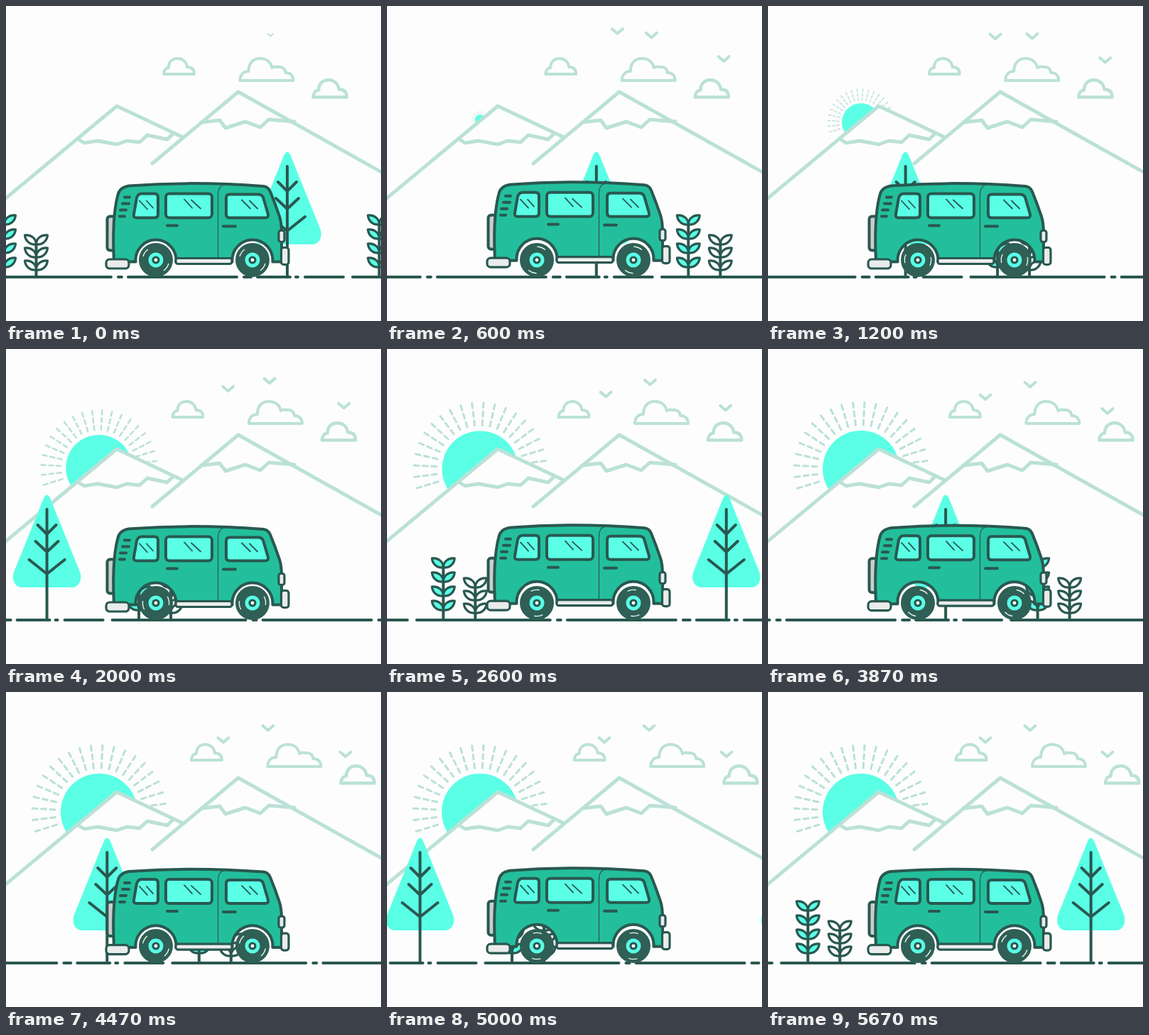
These frames come from a looping animation (528 by 444 pixels, 5740 ms). An HTML page:

```html
<!DOCTYPE html>
<html lang="en">
<head>
<meta charset="utf-8">
<title>Van trip</title>
<style>
  html, body { margin: 0; width: 100%; height: 100%; overflow: hidden; background: #fdfdfd; }
  svg { display: block; width: 528px; height: 444px; }
  .pale, .dark { fill: none; stroke-width: 4; stroke-linecap: round; stroke-linejoin: round; }
  .pale { stroke: #bbe1d7; }
  .dark { stroke: #295850; }
  .ridge { stroke-width: 5; }
  .medium { stroke-width: 3.2; }
  .thin { stroke-width: 1.8; }
  .paper { fill: #fdfdfd; }
  .cyan { fill: #5affe6; }
  .body { fill: #23bf9c; }
  .chrome { fill: #e9eceb; }
  .grey { fill: #c9cecd; }
  .tire { fill: #2f5f55; }
  .shine { fill: none; stroke: #e4f3ee; stroke-width: 1.4; }
  #road { stroke-dasharray: 148 10 5 9 153 10 10 9 46 8 3 10 54 13 40 0; }
  #rays { stroke-width: 3; stroke-dasharray: 7 5.5; }
</style>
</head>
<body>
<svg viewBox="0 0 528 444">
  <defs>
    <path id="bird" class="pale" d="M-7.5-3.5L0 3L7.5-3.5"/>
    <path id="cloud" d="M0 0H43C43-7 39-10 33-10C32-18 26-22 20-22C12-22 7-17 7-9C3-9 0-5 0 0Z"/>
    <g id="leaves">
      <path id="leaf" d="M0 1C0-8 8-13 16-12C15-3 8 2 0 1Z"/>
      <use href="#leaf" transform="scale(-1 1)"/>
    </g>
    <g id="wheel">
      <circle class="tire" r="24"/>
      <path id="shine" class="shine" d="M-18-5A19 19 0 0 1-11-15M18 5A19 19 0 0 1 11 15"/>
      <circle class="cyan" r="10.5"/>
      <circle class="dark paper medium" r="4"/>
    </g>
    <g id="strip">
      <path id="road" class="dark" d="M0 382H528"/>
      <g transform="translate(396)">
        <path class="cyan" d="M-4 209Q0 202 4 209L46 313C51 327 44 336 35 336H-35C-44 336-51 327-46 313Z"/>
        <path class="dark" d="M0 226V382M-13 248L0 261L13 248M-16 271L0 286L16 271M-25 297L0 317L25 297"/>
      </g>
      <g class="dark cyan medium" transform="translate(525.5)">
        <path d="M0 306V382" stroke-width="4"/>
        <use href="#leaves" y="307"/><use href="#leaves" y="327"/>
        <use href="#leaves" y="347"/><use href="#leaves" y="367"/>
      </g>
      <g class="dark paper medium" transform="translate(42.5)">
        <path d="M0 334V382" stroke-width="4"/>
        <use href="#leaves" y="335"/><use href="#leaves" y="353"/><use href="#leaves" y="371"/>
      </g>
    </g>
  </defs>

  <g id="sun">
    <circle class="cyan" r="54"/>
    <path id="rays" class="pale"/>
  </g>

  <g class="pale ridge">
    <path class="paper" stroke="none" d="M0 271L156 141L249 185V271Z"/>
    <path d="M-4 274L156 141L249 185M206 222L327 121L532 236"/>
    <path d="M102 188L110 193L129 190L156 195L170 190L188 192L199 182L227 188L235 180"/>
    <path d="M275 164L301 161L309 172L337 163L358 171L370 160L406 163"/>
  </g>

  <g id="clouds" class="pale">
    <use href="#cloud" x="222" y="96"/>
    <path transform="translate(329.5 105)" d="M0 0H75C75-7 71-11 64-11C64-17 58-20 53-19C50-20 46-19 45-18C43-27 36-31 28-31C18-31 12-24 12-13C5-13 0-8 0 0Z"/>
    <use href="#cloud" transform="translate(432.5 128.5) scale(1.1)"/>
  </g>
  <g id="birds"></g>

  <g id="ground">
    <use href="#strip" x="-528"/><use href="#strip"/><use href="#strip" x="528"/>
  </g>

  <g id="van" class="dark">
    <rect class="grey" x="142.5" y="296" width="12" height="48" rx="4"/>
    <path class="body" d="M152 360C150 320 152 285 158 264Q161 255 173 253Q265 246 362 253.5Q369 254 372 261Q379 278 385 296Q388 305 388 320V360H375.4A28.5 28.5 0 1 0 318.6 360H239.4A28.5 28.5 0 1 0 182.6 360Z"/>
    <path d="M298.5 353V268Q298 254 306 252" stroke-width="1.2"/>
    <g class="cyan">
      <path d="M191 264H209Q214 264 214 269V293Q214 298 209 298H184Q179 298 180 293L184 270Q186 264 191 264Z"/>
      <rect x="225" y="264" width="65" height="34" rx="5"/>
      <path d="M315 265H355Q360 265 362 269L369 293Q370 298 365 298H315Q310 298 310 293V270Q310 265 315 265Z"/>
    </g>
    <path class="thin" d="M188 274L199 286M198 274L207 284M251 272L262 284M261 273L274 285M332 273L344 285M343 274L354 285"/>
    <path d="M227 309H241M306 310H323M167 269H174M164 278H173M161 287H169M160 296H167"/>
    <g class="chrome medium">
      <rect x="239" y="355" width="79" height="8" rx="3"/>
      <rect x="141" y="356.5" width="32" height="13" rx="5"/>
      <rect x="384" y="316" width="8" height="16" rx="3"/>
      <rect x="387.5" y="340" width="10.5" height="24" rx="3.5"/>
    </g>
  </g>
  <use href="#wheel" x="211" y="358"/>
  <use href="#wheel" x="347" y="358"/>
</svg>
<script>
const LOOP = 5740, STEP = 1000 / 15, PERIOD = 528, WHEEL = 22.67;
const $ = s => document.querySelector(s);
const move = (el, value) => el.setAttribute('transform', value);
const clamp = p => Math.min(1, Math.max(0, p));
const easeInOut = p => (1 - Math.cos(Math.PI * clamp(p))) / 2;
const easeOut = p => Math.sin(Math.PI / 2 * clamp(p));
const mix = (a, b, p) => a + (b - a) * p;

let rays = '';
for (let deg = 163; deg <= 353; deg += 10) {
  const c = Math.cos(deg * Math.PI / 180), s = Math.sin(deg * Math.PI / 180);
  rays += `M${62 * c} ${62 * s}L${94 * c} ${94 * s}`;
}
$('#rays').setAttribute('d', rays);

const birds = [
  { from: [326, 33], to: [306, 68], size: 0.15, time: 3300 },
  { from: [372.5, 41], to: [369, 51], size: 0.5, time: 4500 },
  { from: [474, 74], to: [478, 88], size: 0.08, time: 4300 }
];
for (const bird of birds) {
  bird.el = document.createElementNS('http://www.w3.org/2000/svg', 'use');
  bird.el.setAttribute('href', '#bird');
  $('#birds').append(bird.el);
}

function draw(now) {
  const t = Math.floor((now % LOOP + 4) / STEP) * STEP;

  // The van is a little slower over the first stretch.
  const distance = 0.1797 * t - 21 * clamp(t / 1900);
  move($('#ground'), `translate(${-(distance % PERIOD)})`);
  move($('#shine'), `rotate(${distance / WHEEL * 180 / Math.PI})`);
  move($('#van'), `translate(0 ${0.9 * Math.cos(t / 400 * 2 * Math.PI) - 0.4})`);

  const grow = easeOut((t - 400) / 2400);
  move($('#sun'), `translate(131 ${159 + 10 * grow}) scale(${grow})`);

  move($('#clouds'), `translate(${42.5 * easeInOut(t / 5500)})`);
  for (const { el, from, to, size, time } of birds) {
    const p = easeInOut(t / time);
    const [x, y] = from.map((v, i) => mix(v, to[i], p));
    move(el, `translate(${x} ${y}) scale(${mix(size, 1, clamp(t / 500))})`);
  }
}

const start = performance.now();
function tick() {
  draw(performance.now() - start);
  requestAnimationFrame(tick);
}
tick();
</script>
</body>
</html>
```
